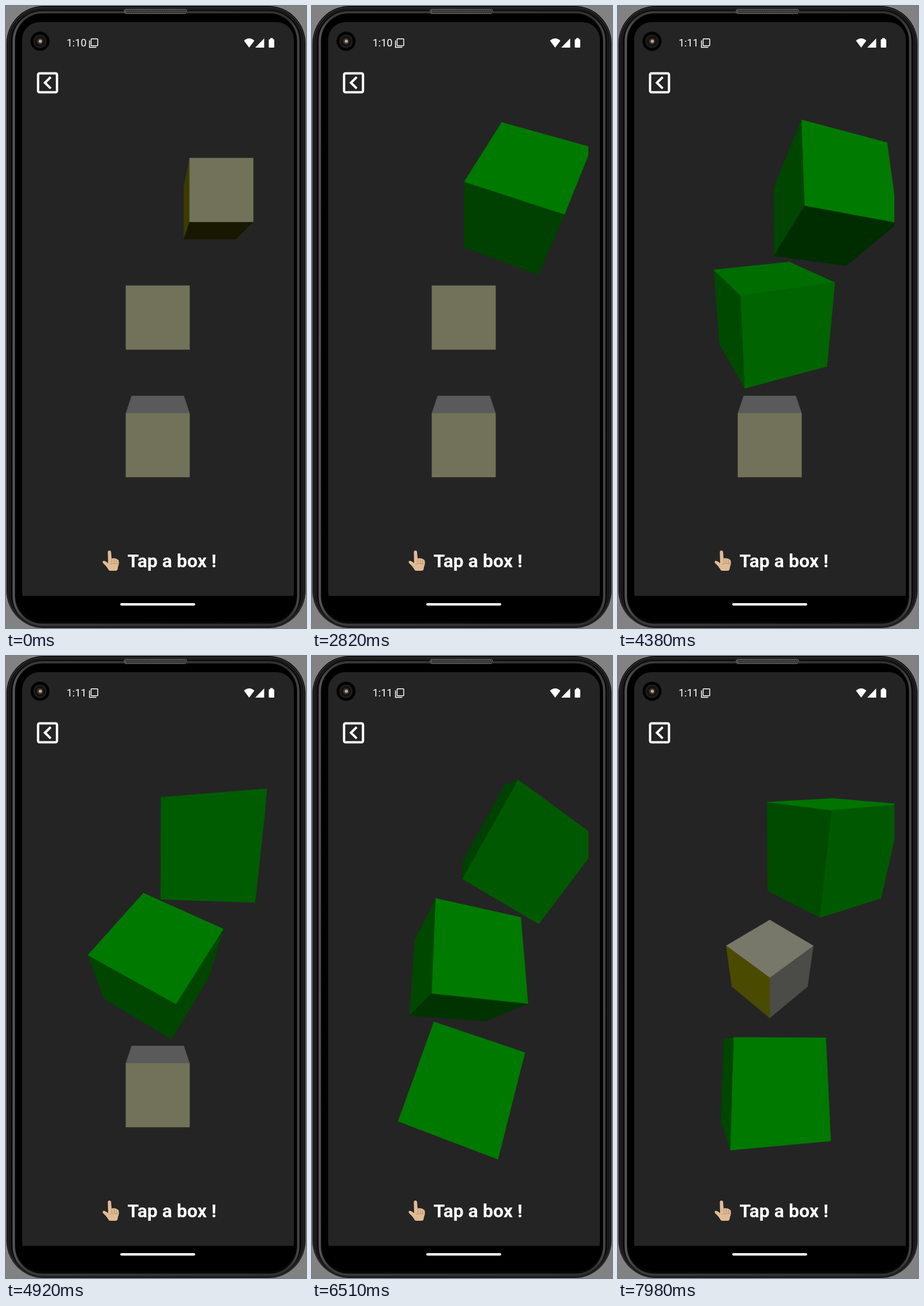
Animation, 520 px wide and 1076 px high, one loop 8 s. Source, as an HTML page with a canvas:

```html
<!DOCTYPE html>
<html lang="en">
<head>
<meta charset="utf-8">
<title>Tap a box</title>
<style>
html, body { margin: 0; width: 100%; height: 100%; overflow: hidden; background: #808080; }
canvas { display: block; width: 520px; height: 1076px; }
</style>
</head>
<body>
<canvas id="stage"></canvas>
<script>
const W = 520, H = 1076, LOOP = 8000;
const canvas = document.getElementById('stage');
const ratio = window.devicePixelRatio || 1;
canvas.width = W * ratio;
canvas.height = H * ratio;
const g = canvas.getContext('2d');
g.scale(ratio, ratio);

// Camera: five units from the origin, looking down the z axis
const CAM = 5, FOCAL = 496.8, CX = 263, CY = 539;

// Light strength per axis, in linear colour
const WHITE = [0.092, 0.102, 0.102];
const YELLOW = [-0.045, -0.009, 0.067];

// keys: [seconds, radians]; the middle box is drawn last, as it is nearest
const boxes = [
  { at: [1, 2, 0], on: 1.8, off: 9,
    keys: [[1.8, 0.018], [3.87, 2.305], [4.92, 3.468], [5.61, 4.232], [6.51, 5.236], [7.98, 6.88]] },
  { at: [0, -2, 0], on: 5.39, off: 9,
    keys: [[5.39, 0], [5.61, 0.248], [6.51, 1.25], [7.98, 2.889]] },
  { at: [0, 0, 0], on: 4.01, off: 7.55,
    keys: [[4.01, 0], [4.92, 1.018], [5.61, 1.775], [6.51, 2.768], [7.55, 3.927]] }
];

const dot = (a, b) => a[0] * b[0] + a[1] * b[1] + a[2] * b[2];
const add = (a, b, k) => a.map((v, i) => v + b[i] * k);

function angleAt(box, t) {
  if (t < box.on) return 0;
  const keys = box.keys;
  for (let i = 1; i < keys.length; i++) {
    const [t0, a0] = keys[i - 1], [t1, a1] = keys[i];
    if (t < t1) return a0 + (a1 - a0) * (t - t0) / (t1 - t0);
  }
  return keys[keys.length - 1][1];
}

// Box axes after the same turn about y and then x
function axesAt(a) {
  const c = Math.cos(a), s = Math.sin(a);
  return [[c, s * s, -s * c], [0, c, s], [s, -c * s, c * c]];
}

function encode(v) {
  const e = v <= 0.0031308 ? 12.92 * v : 1.055 * Math.pow(v, 1 / 2.4) - 0.055;
  return Math.round(255 * e);
}

function shade(normal, active) {
  const white = Math.max(0, dot(normal, WHITE));
  const both = encode(white + Math.max(0, dot(normal, YELLOW)));
  return active ? `rgb(0,${both},0)` : `rgb(${both},${both},${encode(white)})`;
}

function project(p) {
  const k = FOCAL / (CAM - p[2]);
  return [CX + p[0] * k, CY - p[1] * k];
}

function polygon(points) {
  g.beginPath();
  points.forEach(p => g.lineTo(p[0], p[1]));
  g.closePath();
}

function drawBox(box, t) {
  const active = t >= box.on && t < box.off;
  const half = active ? 0.75 : 0.5;
  const axes = axesAt(angleAt(box, t));
  for (let i = 0; i < 3; i++) {
    for (const sign of [-1, 1]) {
      const normal = axes[i].map(v => v * sign);
      const center = add(box.at, normal, half);
      if (dot(normal, add(center, [0, 0, CAM], -1)) >= 0) continue;
      const u = axes[(i + 1) % 3], v = axes[(i + 2) % 3];
      polygon([[-1, -1], [1, -1], [1, 1], [-1, 1]].map(([a, b]) =>
        project(add(add(center, u, a * half), v, b * half))));
      g.fillStyle = g.strokeStyle = shade(normal, active);
      g.lineWidth = 0.5;
      g.fill();
      g.stroke();
    }
  }
}

function round(x, y, w, h, r) {
  g.beginPath();
  g.roundRect(x, y, w, h, r);
}

function disc(x, y, r, color) {
  g.fillStyle = color;
  g.beginPath();
  g.arc(x, y, r, 0, 7);
  g.fill();
}

function ring(inset, width, color, r) {
  round(inset, inset * 0.8, W - 2 * inset, H - inset * 1.2, r);
  g.strokeStyle = color;
  g.lineWidth = width;
  g.stroke();
}

function drawPhone() {
  g.fillStyle = '#828282';
  g.fillRect(0, 0, W, H);
  round(1, 0, 518, 1076, 64);
  g.fillStyle = '#080808';
  g.fill();
  ring(3.5, 1.5, '#353535', 60);
  ring(7, 3, '#1c1c1c', 57);
  const metal = g.createLinearGradient(0, 0, W, 0);
  metal.addColorStop(0, '#6a6a6a');
  metal.addColorStop(0.06, '#3a3a3a');
  metal.addColorStop(0.94, '#303030');
  metal.addColorStop(1, '#555');
  ring(13.5, 4, metal, 50);
  round(16, 13, 488, 1052, 48);
  g.fillStyle = '#000';
  g.fill();

  round(204, 5, 110, 9, 4.5);
  g.fillStyle = '#505050';
  g.fill();
  g.fillStyle = '#181818';
  for (let x = 208; x < 311; x += 3) {
    g.fillRect(x, 7, 1.5, 2);
    g.fillRect(x + 1.5, 10, 1.5, 2);
  }

  g.save();
  round(28, 28, 471, 1030, [30, 30, 44, 44]);
  g.clip();
  g.fillStyle = '#242424';
  g.fillRect(28, 28, 471, 992.5);
  g.restore();

  disc(59, 61, 16.5, '#000');
  disc(59, 61, 11.5, '#1f1f1f');
  disc(59, 61, 9, '#111');
  disc(59, 61, 5.5, '#3a302a');
  disc(59.5, 61, 2.8, '#b8a898');
}

function drawStatus(t) {
  g.fillStyle = g.strokeStyle = '#fff';
  g.font = '18px Roboto, sans-serif';
  g.fillText(t < 3 ? '1:10' : '1:11', 105, 70);

  g.lineWidth = 1.5;
  round(147.5, 56.8, 11.5, 12, 1);
  g.stroke();
  g.beginPath();
  g.moveTo(144.7, 59.5);
  g.lineTo(144.7, 71.5);
  g.lineTo(156.5, 71.5);
  g.stroke();

  g.beginPath();
  g.moveTo(421.5, 72);
  g.lineTo(412.5, 60);
  g.quadraticCurveTo(421.5, 52, 430.5, 60);
  g.closePath();
  g.fill();
  polygon([[432, 72], [447.5, 72], [447.5, 56]]);
  g.fill();
  round(455.5, 57.5, 9.5, 14.5, 1.3);
  g.fill();
  g.fillRect(458, 55.5, 4.5, 3);
}

function drawBack() {
  g.strokeStyle = '#fff';
  g.lineWidth = 4;
  round(55.6, 116.4, 32.8, 32.8, 2.5);
  g.stroke();
  g.beginPath();
  g.moveTo(77.5, 123);
  g.lineTo(67.5, 132.8);
  g.lineTo(77.5, 142.6);
  g.stroke();
}

function drawHand() {
  g.fillStyle = '#e0bb95';
  g.beginPath();
  g.moveTo(176.5, 945);
  g.quadraticCurveTo(176.5, 942, 179.2, 942);
  g.quadraticCurveTo(182, 942, 182.2, 945);
  g.lineTo(183, 955.5);
  g.quadraticCurveTo(190, 954, 195, 958.5);
  g.quadraticCurveTo(197, 964, 194.2, 970);
  g.lineTo(193.5, 974);
  g.quadraticCurveTo(193, 977, 189.5, 977);
  g.lineTo(180, 977);
  g.quadraticCurveTo(178, 977, 177, 974);
  g.quadraticCurveTo(174, 969, 168, 963.5);
  g.quadraticCurveTo(166.5, 960, 170, 959.7);
  g.quadraticCurveTo(173, 960, 177, 964);
  g.closePath();
  g.fill();
  g.strokeStyle = '#b78b62';
  g.lineWidth = 0.9;
  g.beginPath();
  for (const [x, y] of [[183.2, 956], [187.5, 956.5], [191.6, 958]]) {
    g.moveTo(x, y);
    g.lineTo(x + 0.3, y + 7);
  }
  g.moveTo(180, 966);
  g.quadraticCurveTo(186, 963, 194.5, 965.5);
  g.stroke();
}

function drawFooter() {
  drawHand();
  g.fillStyle = '#fff';
  g.font = 'bold 32px Roboto, sans-serif';
  g.fillText('Tap a box !', 210.5, 971);
  round(198, 1033, 130, 4.2, 2.1);
  g.fill();
}

function draw(ms) {
  const t = ms / 1000;
  drawPhone();
  drawStatus(t);
  drawBack();
  drawFooter();
  g.save();
  g.beginPath();
  g.rect(47, 158, 432, 762);
  g.clip();
  boxes.forEach(box => drawBox(box, t));
  g.restore();
}

const start = performance.now();
function tick() {
  draw((performance.now() - start) % LOOP);
  requestAnimationFrame(tick);
}
tick();
</script>
</body>
</html>
```
